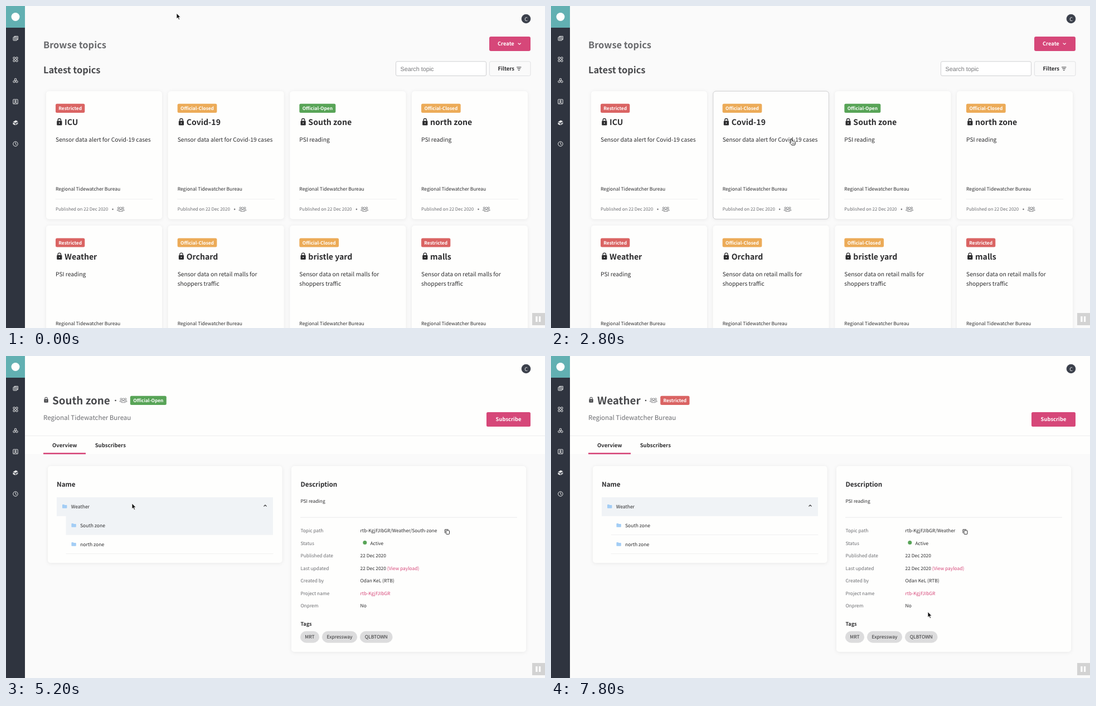
An HTML page for the animation above (8 s loop, 967 by 579 pixels).

```html
<!DOCTYPE html>
<html lang="en">
<head>
<meta charset="utf-8">
<title>Topic browser</title>
<style>
  html, body { margin: 0; width: 100%; height: 100%; overflow: hidden; background: #fafafa; }
  svg { display: block; width: 967px; height: 579px; }
  text {
    font-family: "Noto Sans CJK SC", "Noto Sans CJK JP", "Noto Sans CJK KR", "Noto Sans", sans-serif;
    text-rendering: geometricPrecision; white-space: pre;
  }
  .panel { fill: #fefefd; filter: drop-shadow(0 1px 3px rgba(0, 0, 0, .07)); }
  .line { fill: none; stroke-linecap: round; stroke-linejoin: round; }
</style>
</head>
<body>
<svg id="stage" viewBox="0 0 967 579"></svg>
<script>
const INK = '#2c2c2e', GREY = '#6b6c70', PINK = '#d64779', WHITE = '#fefefd';
const AGENCY = 'Regional Tidewatcher Bureau', PROJECT = 'rtb-KgjFJIbGR';
const LEVELS = {
  Restricted: ['#da6463', 52.3],
  'Official-Closed': ['#ecab58', 70.7],
  'Official-Open': ['#58a457', 65],
};
const TOPICS = [
  ['Restricted', 'ICU', ['Sensor data alert for Covid-19 cases']],
  ['Official-Closed', 'Covid-19', ['Sensor data alert for Covid-19 cases']],
  ['Official-Open', 'South zone', ['PSI reading']],
  ['Official-Closed', 'north zone', ['PSI reading']],
  ['Restricted', 'Weather', ['PSI reading']],
  ['Official-Closed', 'Orchard', ['Sensor data on retail malls for', 'shoppers traffic']],
  ['Official-Closed', 'bristle yard', ['Sensor data on retail malls for', 'shoppers traffic']],
  ['Restricted', 'malls', ['Sensor data on retail malls for', 'shoppers traffic']],
];
const CARD = { w: 208, h: 230 };
const cardPos = i => [72 + (i % 4) * 218.67, 153.2 + (i >> 2) * 241.6];

// Drawing helpers
const text = (x, y, s, size, fill = INK, weight = 400, extra = '') =>
  `<text x="${x}" y="${y}" font-size="${size}" fill="${fill}" font-weight="${weight}" ${extra}>${s}</text>`;
const bold = (x, y, s, size, fill = INK, extra) => text(x, y, s, size, fill, 600, extra);
const rect = (x, y, w, h, fill, r = 0, extra = '') =>
  `<rect x="${x}" y="${y}" width="${w}" height="${h}" rx="${r}" fill="${fill}" ${extra}/>`;
const panel = (x, y, w, h) => rect(x, y, w, h, WHITE, 5, 'class="panel"');
const circle = (x, y, r, fill, extra = '') => `<circle cx="${x}" cy="${y}" r="${r}" fill="${fill}" ${extra}/>`;
const line = (d, stroke, width = 1) => `<path class="line" d="${d}" stroke="${stroke}" stroke-width="${width}"/>`;
const at = (x, y, body, scale = 1) => `<g transform="translate(${x} ${y}) scale(${scale})">${body}</g>`;

const badge = (x, y, level) => {
  const [fill, w] = LEVELS[level];
  return rect(x, y, w, 16.2, fill, 2.5) +
    bold(x + w / 2, y + 11.2, level, 8.3, '#fff', 'text-anchor="middle"');
};
const lock = (x, y, scale, fill = INK) => at(x, y,
  rect(-4.6, -2, 9.2, 8, fill, 1.2) + line('M-2.7 -2V-3.2A2.7 2.7 0 0 1 2.7 -3.2V-2', fill, 1.3) +
  circle(0, 2, 1, WHITE), scale);
const people = (x, y) => at(x, y,
  [[0, -1.6, 1.9], [-4, -2.2, 1.5], [4, -2.2, 1.5]]
    .map(([cx, cy, r]) => circle(cx, cy, r, 'none', `stroke="${GREY}" stroke-width=".8"`)).join('') +
  line('M-3.2 3.8V2.8Q-3 1 0 1T3.2 2.8V3.8ZM-3.9 2.6H-6.3V1.6Q-6 .2 -3.4 .2M3.9 2.6H6.3V1.6Q6 .2 3.4 .2', GREY, .8));
const folder = (x, y) =>
  `<path transform="translate(${x} ${y})" fill="#a3cdf5" d="M0 .8Q0 0 .8 0H3.2L4.2 1H7.6Q8.4 1 8.4 1.8V6Q8.4 6.8 7.6 6.8H.8Q0 6.8 0 6Z"/>`;

const sidebar = () => {
  const c = '#eceded';
  const box = (x, y, w, h, r = .5) => rect(x, y, w, h, 'none', r, `stroke="${c}" stroke-width="1"`);
  const ring = (x, y, r) => circle(x, y, r, 'none', `stroke="${c}" stroke-width="1"`);
  const icons = [
    box(-4, -2, 6.5, 6) + line('M-2 -2V-3.6H4.4V2.4H2.5M-2.2 0H.8M-2.2 2H.8', c),
    [[-4, -4], [.8, -4], [-4, .8], [.8, .8]].map(([x, y]) => box(x, y, 3.2, 3.2)).join(''),
    ring(0, -2, 1.8) + ring(-2.4, 2, 1.8) + ring(2.4, 2, 1.8),
    box(-4.2, -4, 8.4, 8) + ring(0, -1, 1.3) + line('M-2.5 3Q-2 1.3 0 1.3T2.5 3', c),
    `<path fill="${c}" d="M-4.5 -1.6L.5 -4.4 4.5 -2.6 -.5 .3ZM-4.5 -.6L-.6 1.4V4.5L-4.5 2.5Z"/>` +
      '<path fill="#b9bbc0" d="M.3 1.4L4.5 -1.2V2L.3 4.5Z"/>',
    ring(0, 0, 4.2) + line('M0 -2.4V.2L1.7 1.2', c),
  ];
  return rect(0, 0, 34, 579, '#2f343f') + rect(0, 0, 34, 39, '#62b0b2') + circle(17, 19.5, 7.5, WHITE) +
    icons.map((icon, i) => at(17, 58 + 38 * i, icon)).join('');
};

const chrome = () => sidebar() + circle(933, 23, 8.3, '#3c414c') +
  text(933, 26.6, 'C', 9, '#fff', 400, 'text-anchor="middle"') +
  rect(944, 552, 23, 22, '#d3d3d3') + rect(950.3, 558, 3.2, 10, '#fff') + rect(956, 558, 3.2, 10, '#fff');

const card = ([level, title, lines], i) => {
  const [x, y] = cardPos(i);
  return panel(x, y, CARD.w, CARD.h) + at(x + 17, y,
    badge(0, 22.6, level) + lock(6.8, 55.2, 1) + bold(16, 60.8, title, 14.1) +
    lines.map((s, k) => text(0, 91.2 + 17.2 * k, s, 10.3)).join('') +
    text(0, 178.8, AGENCY, 8.5) + line('M0 194H174', '#f0f0f0') +
    text(0, 214.7, 'Published on 22 Dec 2020', 7.95, GREY) +
    circle(102.5, 212.3, 1.2, GREY) + people(116.8, 212));
};

const browsePage = () =>
  bold(67, 76, 'Browse topics', 16.4, '#68696c') + bold(67, 121, 'Latest topics', 16.4, '#48494c') +
  rect(867, 55, 74, 26, PINK, 3) + bold(882, 71.4, 'Create', 9.3, '#fff') + line('M919 67L921.2 69.2 923.4 67', '#fff', 1.1) +
  rect(699.5, 99.8, 162, 25.7, '#fff', 2.5, 'stroke="#cfd0d2"') +
  text(707.5, 116.8, 'Search topic', 10.8, '#77787b', 400, `style="font-family:'Liberation Sans',sans-serif"`) +
  rect(867.5, 99.8, 73.5, 25.7, '#fafafa', 2.5, 'stroke="#dfe0e2"') + bold(882.5, 116.2, 'Filters', 9.5) +
  line('M916.5 110H924M917.8 112.7H922.7M919.2 115.4H921.2', INK, 1) +
  TOPICS.map(card).join('');

const blankPage = () => rect(34, 0, 933, 80, WHITE);

const detailPage = (title, level, path, shift, copyX) => {
  const rows = [
    ['Topic path', PROJECT + path], ['Status', ''], ['Published date', '22 Dec 2020'],
    ['Last updated', `22 Dec 2020 <tspan fill="${PINK}">(View payload)</tspan>`],
    ['Created by', 'Odan KeL (RTB)'], ['Project name', `<tspan fill="${PINK}">${PROJECT}</tspan>`], ['Onprem', 'No'],
  ];
  const chips = [[528, 34, 'MRT'], [567, 63, 'Expressway'], [635, 58.5, 'QLBTOWN']];
  const nested = title === 'South zone';
  return rect(34, 0, 933, 176.5, WHITE) + line('M34 143.5H967', '#ededee') +
    lock(72, 79, .8, '#48494c') + bold(83, 87, title, 18.8, '#48494c') +
    circle(196.5 - shift, 80, 1.3, '#48494c') + people(210.5 - shift, 79.5) + badge(222.8 - shift, 71.7, level) +
    text(67, 115.3, AGENCY, 11.5, GREY) +
    rect(862, 101, 79, 26, PINK, 2.5) + bold(901.5, 117.4, 'Subscribe', 9.4, '#fff', 'text-anchor="middle"') +
    bold(83, 164.3, 'Overview', 9.5) + bold(159.7, 164.3, 'Subscribers', 9.5) + rect(67, 174, 76, 2.6, PINK) +
    panel(75, 198, 420.5, 174) + bold(91, 234.5, 'Name', 11.65) +
    (nested ? rect(107.5, 288, 371.5, 33.8, '#f0f3f6') : line('M108 321.5H479', '#f0f0f0')) +
    line('M108 355.5H479', '#f0f0f0') +
    rect(91, 254, 388, 34, '#f0f3f6', 0, nested ? 'class="root-row"' : '') +
    folder(101, 267) + text(116.7, 273.6, 'Weather', 8.55) + line('M462.8 270.2L465 268 467.2 270.2', INK, 1.1) +
    folder(117.4, 301) + text(133, 307.6, 'South zone', 8.55) +
    folder(117.4, 335) + text(133, 341.6, 'north zone', 8.55) +
    panel(512, 198, 421, 334) + bold(528.4, 234.5, 'Description', 11.65) +
    text(528.4, 264.2, 'PSI reading', 8.4) + line('M528.5 290.2H916.5', '#e9e9ea') +
    rows.map(([label, value], i) => text(528.4, 317.2 + 22.5 * i, label, 8.4, GREY) +
      text(635.6, 317.2 + 22.5 * i, value, 8.4)).join('') +
    circle(643.8, 335.5, 3.5, '#58a457') + text(653.5, 340, 'Active', 8.4) +
    at(copyX, 316, line('M-4 2V-4H1.8', INK, 1) + rect(-2, -2.2, 6, 6.6, 'none', .8, `stroke="${INK}" stroke-width="1"`)) +
    bold(528.4, 484.7, 'Tags', 9) +
    chips.map(([x, w, s]) => rect(x, 494.7, w, 21, '#dcdcdd', 10.5) +
      text(x + w / 2, 508.3, s, 8.5, INK, 400, 'text-anchor="middle"')).join('');
};

const PAGES = {
  browse: browsePage(),
  blank: blankPage(),
  south: detailPage('South zone', 'Official-Open', '/Weather/South-zone', 0, 791.5),
  weather: detailPage('Weather', 'Restricted', '/Weather', 26.6, 743),
};
const ARROW = '<path d="M0 0V10L2.3 7.9 3.9 11.6 5.6 10.9 4 7.3H7Z" fill="#111" stroke="#fff" stroke-width=".8"/>';
const HAND = '<path d="M-1.2 1.2C-1.2 -.2 1 -.2 1.2 1L1.9 4C3 3.4 4 3.6 4.3 4.4C5.3 3.9 6 4.3 6.2 5C7.2 4.8 7.7 5.4 7.7 6.2' +
  'C7.8 8.5 7 10 6.5 11H1C0 9 -2 8 -2.8 6.6C-3 5.6 -1.8 5.4 -.6 6.6Z" fill="#fff" stroke="#222" stroke-linejoin="round"/>' +
  line('M2.2 6.8V9M4 6.8V9M5.6 6.8V9', '#222', .6);

const stage = document.getElementById('stage');
stage.innerHTML = rect(0, 0, 967, 579, '#fafafa') +
  Object.entries(PAGES).map(([name, body]) => `<g id="${name}">${body}</g>`).join('') + chrome() +
  rect(0, 0, CARD.w - .5, CARD.h, 'none', 5, 'id="outline" stroke="#cfcfd1"') +
  `<g id="cursor"><g id="arrow">${ARROW}</g><g id="hand">${HAND}</g></g>`;
const find = id => stage.querySelector(id);
const show = (el, on) => { el.style.display = on ? '' : 'none'; };

// Timeline: [start ms, page] and [ms, x, y]
const LOOP = 8000, TICK = 200;
const SCENES = [[0, 'browse'], [4000, 'blank'], [4200, 'south'], [6200, 'blank'], [6400, 'weather']];
const MOVES = [
  [0, 306, 13], [1600, 182, 217], [1800, 182, 217], [3600, 609, 255], [4600, 609, 255],
  [5200, 226, 265], [5800, 121, 271], [6400, 121, 271], [7200, 655, 503], [7800, 676, 460], [LOOP, 676, 460],
];

function cursorAt(t) {
  const i = MOVES.findIndex(([end]) => end > t);
  const [t0, x0, y0] = MOVES[i - 1], [t1, x1, y1] = MOVES[i];
  const p = (t - t0) / (t1 - t0), e = p * p * (3 - 2 * p);
  return [x0 + (x1 - x0) * e, y0 + (y1 - y0) * e];
}

function draw(now) {
  const t = Math.floor((now % LOOP) / TICK) * TICK;
  const page = SCENES.filter(([start]) => start <= t).pop()[1];
  const [x, y] = cursorAt(t);
  for (const name in PAGES) show(find('#' + name), name === page);

  const hovered = page === 'browse' && t > 1600 ? TOPICS.findIndex((_, i) => {
    const [cx, cy] = cardPos(i);
    return x > cx && x < cx + CARD.w && y > cy && y < cy + CARD.h;
  }) : -1;
  show(find('#outline'), hovered >= 0);
  if (hovered >= 0) {
    const [cx, cy] = cardPos(hovered);
    find('#outline').setAttribute('transform', `translate(${cx + .2} ${cy})`);
  }
  show(find('.root-row'), x > 91 && x < 479 && y > 254 && y < 288);

  const pointing = hovered >= 0 || (t >= 4000 && t < 4800) || (t >= 5600 && t < 6600);
  show(find('#hand'), pointing);
  show(find('#arrow'), !pointing);
  find('#cursor').setAttribute('transform', `translate(${x} ${y})`);
}

const began = performance.now();
(function frame() {
  draw(performance.now() - began);
  requestAnimationFrame(frame);
})();
</script>
</body>
</html>
```
